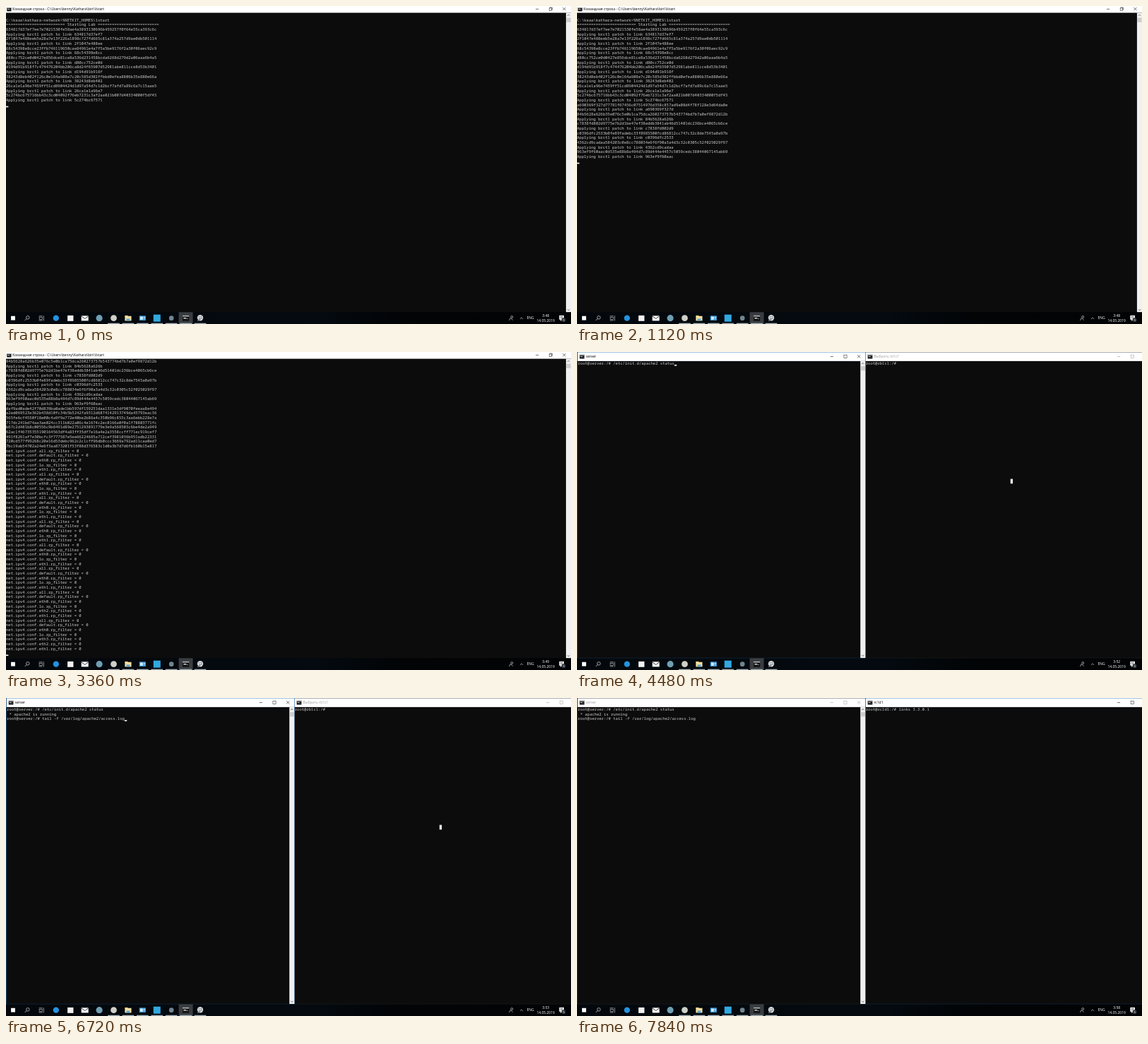
Recreate the animation shown at these times as an HTML page with a canvas. Size 800 px wide and 450 px high, loop 8000 ms.

```html
<!DOCTYPE html>
<html lang="ru">
<head>
<meta charset="utf-8">
<title>Lab start</title>
<style>
html, body { margin: 0; width: 100%; height: 100%; overflow: hidden; background: #0c0c0c; }
canvas { display: block; width: 100vw; height: 100vh; }
</style>
</head>
<body>
<canvas id="stage"></canvas>
<script>
const canvas = document.getElementById('stage');
const ctx = canvas.getContext('2d');
const dpr = window.devicePixelRatio || 1;
canvas.width = 800 * dpr;
canvas.height = 450 * dpr;

// The desktop is laid out in 1920 x 1080 units, with 8 x 16 console cells.
const SCALE = 800 / 1920 * dpr;
const LOOP = 8000, STEP = 1120;
const CELL_W = 8, CELL_H = 16;
const BAR_Y = 1040;
const MONO = '13.333px "Noto Sans Mono", "DejaVu Sans Mono", monospace';
const UI = '12px "Open Sans", "Noto Sans", sans-serif';
const BLUE = '#1a78c2', INK = '#0c0c0c', GREY = '#a0a0a0';

const links = `
634817d37ef7ee7e7021530fe58ae4a3893130696b459257f0f64e55ca393c6c
2f1047e488eeb5e28a7e13f226a1898c727fd665c81a374a257d9ae0db501114
68c54398e8cce23ffb746119650cae84961e4a7f5a5be9176f2a30f06aec92c9
d80cc752ce0d0427e856dce81ce8a536d231458bcda6268d279d2a06aaa6b4a5
d194d91b918f7c474476204bb206ca8d24f65907d52981abe811cce8d53b3401
38243d8eb402f126c0e164a608e7c20c585d302ffbbd0efea8806b35e880e66a
26ca1e1a96e7459ff51cd8904424d1d97a54d7c1d2bcf7afd7a89c6a7c15aae5
5c274bc675716bb43c3cd04092f76eb7231c3af2aa021b007d40334000f5df45
a690369f327d77781f67456c07514976d358c857ad9a08d4f78f128e3d64da0e
84b5628a626b35e076c5e0b1ca75dca260273757b543774bd7b7a0ef9872d12b
c7838fd802d9775e7b2d1be47ef38eddb3841ab46d51401dc236bce4065cb6ce
c0396dfc2533b0fe89fadebc33f8985500fcd86812cc747c32c8de7545a0a97b
4362cd9cadaa584203c0e8cc788034e6f6f90a3a4d3c32c0305c52f025029f97
963ef9f60aac0d535e88b8a494d7c89d444e4457c5059cedc38044067145ab69`.trim().split('\n');

const machines = `
daf9ad0ade42f70d839ba0ade1bb597df159251daa1331e3df9070feeaa8e494
a2ed069523e362b438d10fc34b5b5242fa9312d6874142913749da45793eac36
565fe6cf4550f18e00c4a9f9a772e40be2b86a4c350b96c855c3aa6ebb228e7a
717dc241bd74aa3ae024cc311b022a06c4e1674c2ec0166a0f0a1f78803771fc
b67c2d481b8c00556c9b8491d89e2751293891779e3e9a568503c6be4de2a949
62ac1f46735355190164563df4a83ff35df7e16a4e2a3558ccff771ec919cef7
491f8261af7e30bcfc3f777587e5ee66224685a712cef3981036b951adb22331
720cd577f99268c20e16d53debc962c2c1cff96db0ccc3669a792ad11caa0ed7
7bc19ab54702a24e6f3aa873201f53f88d376583c1d0a3b7d7d6fb160b15e817`.trim().split('\n');

const base = ['all', 'default', 'eth0', 'lo'];
const devices = [];
for (let i = 0; i < 6; i++) devices.push(...base, 'eth1');
devices.push(...base, 'eth2', 'eth1', ...base, 'eth3', 'eth2', 'eth1');

const log = [
  '',
  'C:\\kaaa\\kathara-network>%NETKIT_HOME%\\lstart',
  '='.repeat(25) + ' Starting Lab ' + '='.repeat(26),
  ...links.flatMap(id => [id, 'Applying brctl patch to link ' + id.slice(0, 12)]),
  ...machines,
  ...devices.map(d => `net.ipv4.conf.${d}.rp_filter = 0`)
];

const prompt = 'root@server:/# ';
const status = prompt + '/etc/init.d/apache2 status';
const running = [status, ' * apache2 is running'];
const tail = prompt + 'tail -f /var/log/apache2/access.log';

const scenes = [
  { clock: '3:48', rows: 19 },
  { clock: '3:48', rows: 31 },
  { clock: '3:49', rows: 46 },
  { clock: '3:49', rows: 83 },
  { clock: '3:52', left: [status] },
  { clock: '3:53', left: [...running, prompt] },
  { clock: '3:53', left: [...running, tail] },
  { clock: '3:58', left: [...running, tail], links: true }
];

function rect(x, y, w, h, color) {
  ctx.fillStyle = color;
  ctx.fillRect(x, y, w, h);
}

function disc(x, y, r, color) {
  ctx.fillStyle = color;
  ctx.beginPath();
  ctx.arc(x, y, r, 0, Math.PI * 2);
  ctx.fill();
}

function path(points, color, width = 1.5) {
  ctx.strokeStyle = color;
  ctx.lineWidth = width;
  ctx.beginPath();
  points.forEach(([x, y], i) => i ? ctx.lineTo(x, y) : ctx.moveTo(x, y));
  ctx.stroke();
}

function box(x, y, w, h, color, width = 1.3) {
  ctx.strokeStyle = color;
  ctx.lineWidth = width;
  ctx.strokeRect(x, y, w, h);
}

function label(text, x, y, color, align = 'left') {
  ctx.font = UI;
  ctx.textAlign = align;
  ctx.fillStyle = color;
  ctx.fillText(text, x, y);
}

function consoleText(lines, x, y, cursor) {
  ctx.font = MONO;
  ctx.textAlign = 'left';
  ctx.fillStyle = '#cccccc';
  lines.forEach((line, i) => ctx.fillText(line, x, y + i * CELL_H + 12));
  if (!cursor) return;
  const [col, row] = cursor;
  rect(x + col * CELL_W, y + row * CELL_H + 12, CELL_W, 4, '#f2f2f2');
}

function terminalIcon(x, y, size = 16) {
  rect(x, y, size, size * 0.85, '#111');
  rect(x, y, size, size * 0.17, '#b8b8b8');
  rect(x + size * 0.15, y + size * 0.34, size * 0.42, size * 0.16, '#ddd');
  rect(x + size * 0.62, y + size * 0.46, size * 0.2, size * 0.08, '#ddd');
}

function controls(x, y, color, maximized) {
  path([[x - 5, y + 0.5], [x + 5, y + 0.5]], color);
  const m = x + 46, c = x + 92;
  if (maximized) {
    box(m - 5, y - 3, 8, 8, color);
    path([[m - 3, y - 3], [m - 3, y - 5], [m + 5, y - 5], [m + 5, y + 3], [m + 3, y + 3]], color);
  } else {
    box(m - 5, y - 5, 10, 10, color);
  }
  path([[c - 5, y - 5], [c + 5, y + 5]], color);
  path([[c + 5, y - 5], [c - 5, y + 5]], color);
}

function scrollbar(x, top, bottom) {
  const mid = x + 8.5;
  rect(x, top, 17, bottom - top, '#f0f0f0');
  rect(x + 1, top + 17, 15, 15, '#cdcdcd');
  path([[mid - 4, top + 10], [mid, top + 6], [mid + 4, top + 10]], '#505050', 2);
  path([[mid - 4, bottom - 10], [mid, bottom - 6], [mid + 4, bottom - 10]], '#505050', 2);
}

function fullConsole(rows) {
  const first = Math.max(0, rows - 62);
  rect(0, 0, 1920, BAR_Y, INK);
  rect(0, 0, 1920, 23, '#fff');
  terminalIcon(3, 5, 15);
  label('Командная строка - C:\\Users\\benny\\Kathara\\bin\\\\lstart', 22, 15.5, '#000');
  controls(1805, 10, '#222', true);
  scrollbar(1903, 23, BAR_Y);
  consoleText(log.slice(first, rows), 0, 24, [0, rows - first]);
}

function frame(x, w, title, active, buttonX) {
  const ink = active ? '#000' : GREY;
  rect(x, 0, w, BAR_Y, active ? BLUE : '#3a444c');
  rect(x + 1, 1, w - 2, 30, '#fff');
  rect(x + 1, 31, w - 2, BAR_Y - 32, INK);
  terminalIcon(x + 8, 9);
  label(title, x + 29, 20, ink);
  controls(buttonX, 15, active ? '#222' : GREY, false);
}

function splitConsoles({ left, links: browsing }) {
  rect(0, 0, 1920, BAR_Y, INK);
  frame(980, 976, browsing ? 'rc1d1' : 'Выбрать rb1c1', browsing, 1841);
  consoleText([browsing ? 'root@rc1d1:/# links 3.3.0.1' : 'root@rb1c1:/#'], 981, 31);
  if (!browsing) rect(1473, 431, CELL_W, CELL_H, '#f2f2f2');

  frame(1, 980, 'server', !browsing, 866);
  scrollbar(963, 31, BAR_Y - 1);
  const last = left.length - 1;
  consoleText(left, 3, 31, browsing ? null : [left[last].length, last]);
  if (browsing) rect(980, 0, 1, BAR_Y, BLUE);
}

function taskIcons() {
  const y = 1060;
  rect(17, y - 7, 14, 14, '#fff');

  // search and task view
  ctx.strokeStyle = '#e4e4e4';
  ctx.lineWidth = 1.6;
  ctx.beginPath();
  ctx.arc(74, y - 2, 5.5, 0, Math.PI * 2);
  ctx.stroke();
  path([[70, y + 2], [64, y + 8]], '#e4e4e4', 1.8);
  box(113, y - 3, 10, 7, '#ddd');
  path([[112, y - 7], [124, y - 7]], '#ddd');
  path([[112, y + 8], [124, y + 8]], '#ddd');
  path([[128, y - 8], [128, y + 9]], '#ddd');

  const at = i => 170 + 49 * i;
  rect(at(9) - 24, BAR_Y, 48, 40, '#393d41');
  for (let i = 4; i <= 10; i++) rect(at(i) - 20, 1077, 40, 3, '#a9b4bc');

  disc(at(0), y, 10, '#2493df');
  rect(at(1) - 10, y - 9, 20, 19, '#f2f2f2');

  // mail
  rect(at(2) - 12, y - 8, 24, 17, '#fff');
  path([[at(2) - 12, y - 7], [at(2), y + 2], [at(2) + 12, y - 7]], '#111', 2);

  disc(at(3), y, 11, '#6f9fb4');
  disc(at(4), y, 10.5, '#cfd0c8');

  // folder
  rect(at(5) - 11, y - 9, 10, 4, '#e8c866');
  rect(at(5) - 11, y - 7, 22, 16, '#f4dfa0');
  rect(at(5) - 6, y + 2, 12, 7, '#5ba7d1');

  // window list
  rect(at(6) - 11, y - 8, 22, 16, '#3b9ad9');
  rect(at(6) - 8, y - 5, 9, 10, '#d9eefa');
  rect(at(6) + 3, y - 4, 6, 2, '#d9eefa');
  rect(at(6) + 3, y, 6, 2, '#d9eefa');

  rect(at(7) - 12, y - 12, 24, 24, '#31a8e0');
  disc(at(8), y, 8, '#71858e');
  terminalIcon(at(9) - 11, y - 9, 22);

  // palette
  disc(at(10), y - 1, 10, '#d4d9dc');
  disc(at(10) - 4, y - 4, 2, '#6f8794');
  disc(at(10) + 3, y - 5, 2, '#8b7870');
  disc(at(10) - 3, y + 3, 2, '#68756d');
  path([[at(10) - 9, y + 10], [at(10) + 6, y - 1]], '#858c92', 3);
}

function tray(clock) {
  const y = 1060;
  // people
  ctx.strokeStyle = '#e6e6e6';
  ctx.lineWidth = 1.5;
  ctx.beginPath();
  ctx.arc(1719, y - 4, 3.5, 0, Math.PI * 2);
  ctx.stroke();
  path([[1710, y + 8], [1713, y + 1], [1717, y + 1], [1722, y + 7]], '#e6e6e6');
  path([[1747, y + 3], [1752, y - 2], [1757, y + 3]], '#e6e6e6');
  label('ENG', 1782, y + 4, '#fff', 'center');
  label(clock, 1834, 1055, '#fff', 'center');
  label('14.05.2019', 1834, 1073, '#fff', 'center');

  // notifications
  rect(1880, y - 9, 16, 14, '#fff');
  path([[1885, y + 4], [1885, y + 9], [1891, y + 4]], '#fff', 2);
  path([[1883, y - 5], [1893, y - 5]], '#222');
  path([[1883, y - 1], [1893, y - 1]], '#222');
  disc(1895, y + 6, 7, '#30383e');
  ctx.font = '10px "Open Sans", sans-serif';
  ctx.fillStyle = '#fff';
  ctx.fillText('5', 1895, y + 10);
}

function taskbar(clock) {
  const shade = ctx.createLinearGradient(0, 0, 1920, 0);
  shade.addColorStop(0, '#04080c');
  shade.addColorStop(0.55, '#040a10');
  shade.addColorStop(0.7, '#020406');
  shade.addColorStop(1, '#020305');
  rect(0, BAR_Y, 1920, 40, shade);
  taskIcons();
  tray(clock);
}

function draw() {
  const t = performance.now() % LOOP;
  const scene = scenes[Math.floor(t / STEP)];
  ctx.setTransform(SCALE, 0, 0, SCALE, 0, 0);
  if (scene.left) splitConsoles(scene);
  else fullConsole(scene.rows);
  taskbar(scene.clock);
  requestAnimationFrame(draw);
}

draw();
</script>
</body>
</html>
```
